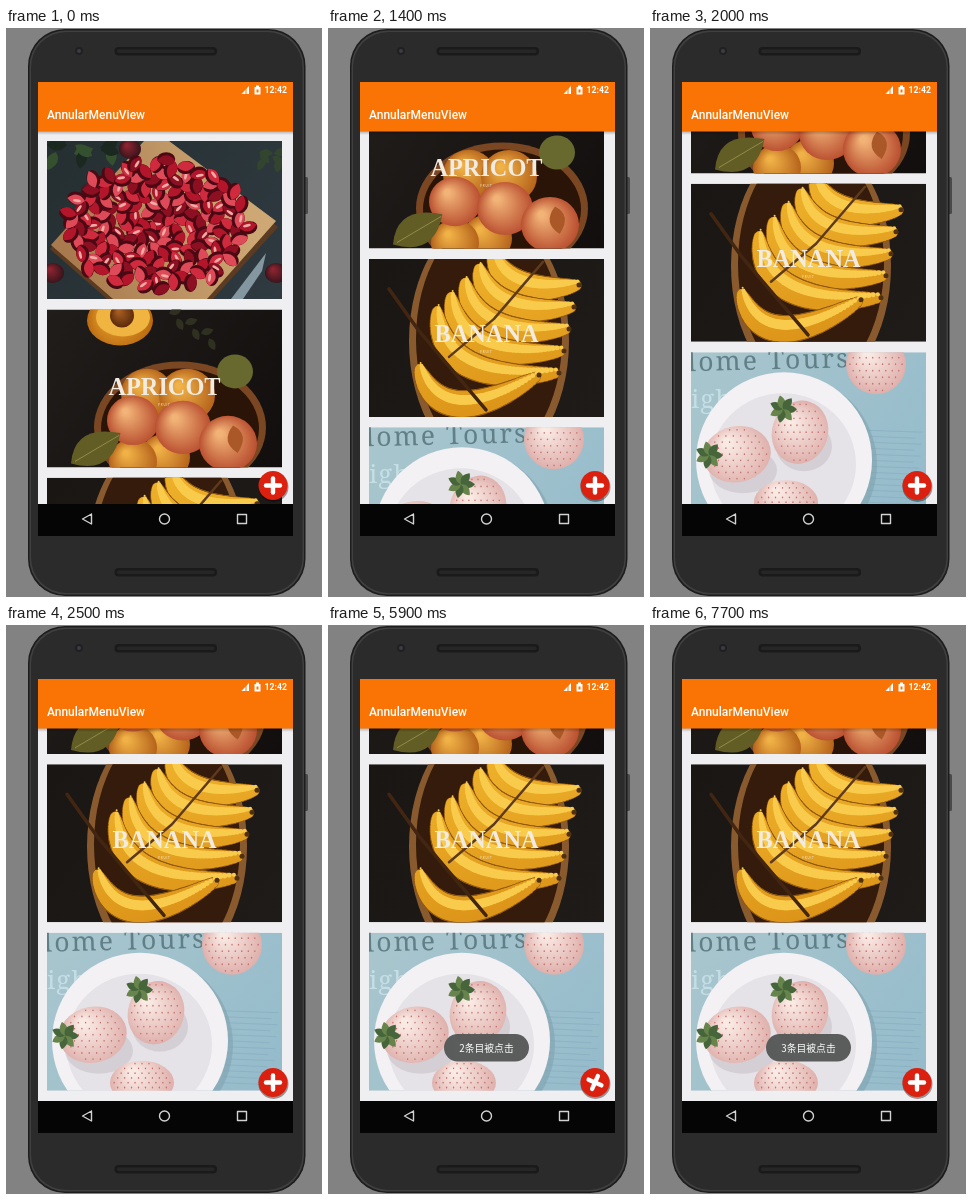
An HTML page with a canvas that plays this animation: 316x569 px, repeating every 8 s.

```html
<!DOCTYPE html>
<html lang="zh">
<head>
<meta charset="utf-8">
<title>AnnularMenuView</title>
<style>
html, body { margin: 0; width: 100%; height: 100%; overflow: hidden; background: #828282; }
canvas { display: block; width: 316px; height: 569px; }
</style>
</head>
<body>
<canvas id="stage" width="316" height="569"></canvas>
<script>
const g = document.getElementById('stage').getContext('2d');
const LOOP = 8000, TAU = Math.PI * 2;
const clamp = u => Math.max(0, Math.min(1, u));
const ease = u => 0.5 - Math.cos(clamp(u) * Math.PI) / 2;
const easeOut = u => 1 - (1 - clamp(u)) ** 1.2;

// Drawing helpers
function box(x, y, w, h, color, r = 0) {
  g.fillStyle = color;
  g.beginPath();
  g.roundRect(x, y, w, h, r);
  g.fill();
}
function oval(x, y, rx, ry, color, turn = 0) {
  g.fillStyle = color;
  g.beginPath();
  g.ellipse(x, y, rx, ry, turn, 0, TAU);
  g.fill();
}
function ball(x, y, rx, ry, light, dark, turn = 0) {
  const r = Math.max(rx, ry);
  const s = g.createRadialGradient(x - r * .3, y - r * .35, r * .1, x, y, r);
  s.addColorStop(0, light);
  s.addColorStop(1, dark);
  oval(x, y, rx, ry, s, turn);
}
function ring(x, y, r, color, width) {
  g.strokeStyle = color;
  g.lineWidth = width;
  g.beginPath();
  g.arc(x, y, r, 0, TAU);
  g.stroke();
}
function ramp(x0, y0, x1, y1, from, to) {
  const s = g.createLinearGradient(x0, y0, x1, y1);
  s.addColorStop(0, from);
  s.addColorStop(1, to);
  return s;
}
function trace(points) {
  g.beginPath();
  for (let i = 0; i < points.length; i += 2) g.lineTo(points[i], points[i + 1]);
}
function poly(color, ...points) {
  g.fillStyle = color;
  trace(points);
  g.fill();
}
function line(color, width, ...points) {
  g.strokeStyle = color;
  g.lineWidth = width;
  g.lineCap = g.lineJoin = 'round';
  trace(points);
  g.stroke();
}
function leaf(x, y, length, turn, color) {
  at(x, y, turn, 1, () => {
    g.fillStyle = color;
    g.beginPath();
    g.quadraticCurveTo;
    g.moveTo(0, 0);
    g.quadraticCurveTo(length * .4, -length * .55, length, 0);
    g.quadraticCurveTo(length * .5, length * .55, 0, 0);
    g.fill();
  });
}
function text(str, x, y, font, color, align = 'left', spacing = 0) {
  g.font = font;
  g.fillStyle = color;
  g.textAlign = align;
  g.letterSpacing = spacing + 'px';
  g.fillText(str, x, y);
}
function at(x, y, turn, scale, draw) {
  g.save();
  g.translate(x, y);
  g.rotate(turn);
  g.scale(scale, scale);
  draw();
  g.restore();
}
function clipped(x, y, w, h, draw) {
  g.save();
  g.beginPath();
  g.rect(x, y, w, h);
  g.clip();
  draw();
  g.restore();
}
function label(word, y) {
  text(word, 117.5, y, 'bold 24.3px "Liberation Serif", serif', '#f1ebe2', 'center');
  text('FRUIT', 117.5, y + 11, '3px Lato, sans-serif', '#f1ebe2', 'center', .8);
}

// Cards, each 235 x 158
function strawberries() {
  box(0, 0, 235, 158, ramp(0, 0, 235, 158, '#252f31', '#2f3a41'));
  for (let i = 0; i < 9; i++) leaf(i * 9, 4 + i * 7 % 12, 20, i * 2, i % 2 ? '#35502f' : '#1a2820');
  for (let i = 0; i < 6; i++) leaf(212 + i * 5, 12 + i * 5 % 14, 14, i * 2, '#33452f');
  poly('#5b3b22', 3, 108, 97, 0, 122, 0, 231, 86, 166, 158, 60, 158);
  poly(ramp(20, 100, 200, 60, '#a87a4d', '#cda774'), 4, 104, 97, 0, 122, 0, 229, 80, 160, 158, 66, 158);
  for (const [x, y] of [[45, 51], [83, 8], [229, 132], [6, 132]]) ball(x, y, 11, 10, '#8d2431', '#35141a');
  const reds = ['#b3152b', '#cf2a3e', '#8d0f22', '#de4a58'];
  const count = 150;
  for (let i = 0; i < count; i++) {
    const d = Math.sqrt(i / count), a = i * 2.4;
    at(110 + Math.cos(a) * d * 92, 84 + Math.sin(a) * d * 66, i * 1.7, 1, () => {
      oval(1, 1.5, 9, 6.5, '#4a0913');
      leaf(-8, 0, 18, 0, reds[i % 4]);
      if (i % 3 == 0) oval(0, -1, 4, 1.4, '#eeaaa4');
    });
  }
  poly('#8496a0', 184, 158, 219, 112, 215, 130, 196, 158);
}

function apricots() {
  box(0, 0, 235, 158, ramp(0, 0, 235, 158, '#211d1b', '#110e0d'));
  for (let i = 0; i < 6; i++) leaf(122 + i * 8, 4 + i * 5, 13, i % 2 * 1.4 - .3, '#2f301f');
  ball(73, 11, 33, 25, '#f3ad38', '#b9690f');
  oval(76, 8, 27, 19, '#f0b441');
  ball(75, 6, 12, 12, '#a55d20', '#5d2b0c');
  oval(133, 118, 86, 66, '#7a4722');
  oval(133, 119, 79, 60, '#2a1408');
  oval(188, 62, 18, 17, '#68692f');
  const fruit = [[100, 84, 26], [140, 86, 28], [118, 148, 25], [86, 152, 24], [86, 111, 26], [136, 118, 28], [181, 134, 29]];
  fruit.forEach(([x, y, r], i) =>
    ball(x, y, r, r * .95, i < 4 ? '#f0b146' : '#f2b377', i < 4 ? '#b5631b' : '#b94f30'));
  leaf(186, 116, 28, 1.4, '#ab5829');
  leaf(24, 154, 58, -.55, '#615d25');
  line('#938b48', 1, 28, 152, 72, 126);
  label('APRICOT', 85.5);
}

// A row of discs along a curve, thin at both ends
function banana(x0, y0, cx, cy, x1, y1) {
  const layers = [[14, '#935a10', 0], [12.7, ramp(60, 0, 110, 160, '#f0b42c', '#dc9418'), 0], [5, '#f9cb4c', 4]];
  for (const [r, color, lift] of layers) for (let u = 0; u <= 1; u += .02) {
    const v = 1 - u, size = r * (.2 + .8 * Math.sqrt(Math.sin(u * Math.PI)));
    const x = v * v * x0 + 2 * u * v * cx + u * u * x1;
    const y = v * v * y0 + 2 * u * v * cy + u * u * y1;
    oval(x + lift * .4, y - lift, size, size, color);
  }
  oval(x1, y1, 2.5, 2.5, '#4f300f');
}
function bananas() {
  box(0, 0, 235, 158, ramp(0, 0, 235, 158, '#1a1614', '#1f1b19'));
  oval(120, 82, 80, 126, '#8a5a2f');
  oval(120, 80, 73, 120, '#341b0b');
  for (let i = -1; i < 4; i++)
    banana(110 - 14 * i, 8 + 14 * i, 118 - 16 * i, 62 + 22 * i, 205 - 5 * i, 48 + 22 * i);
  banana(50, 108, 70, 178, 170, 116);
  line('#422611', 3.5, 20, 30, 50, 72, 117, 151);
  line('#5e3a1c', 2.5, 174, 3, 125, 60, 80, 98);
  label('BANANA', 83.5);
}

function paleBerry(x, y, rx, ry, turn, leafX, leafY) {
  ball(x, y, rx, ry, '#faeae4', '#dfb0ac', turn);
  for (let j = -4; j <= 4; j++) for (let i = -4; i <= 4; i++) {
    const u = (i + (j & 1) / 2) / 4.6, v = j / 4.6;
    if (u * u + v * v < .85) oval(x + u * rx, y + v * ry, .7, .9, '#c4706f');
  }
  for (let i = 0; leafX && i < 7; i++) leaf(leafX, leafY, 14, i * TAU / 7, i % 2 ? '#66844b' : '#47653b');
}
function plate() {
  box(0, 0, 235, 158, ramp(0, 0, 235, 158, '#a9c6cd', '#94bbcb'));
  at(0, 19, -.025, 1, () => text('lome Tours', -3, 0, '26.4px "Noto Serif", serif', '#617f87', 'left', 2.2));
  text('igh', 0, 56, '26px "Noto Serif", serif', '#c5dde4', 'left', 1);
  for (let i = 0; i < 13; i++) line('#82aabd88', 1, 175 + i % 3, 78 + i * 6, 231 - i * 7 % 13, 80 + i * 6);
  oval(97, 112, 89, 89, '#7f9fac88');
  oval(93, 108, 88, 88, '#f3f1f3');
  oval(92, 112, 73, 71, '#e6e3e8');
  oval(52, 118, 34, 23, '#c9c3c999');
  oval(113, 94, 28, 25, '#c9c3c999');
  paleBerry(185, 12, 30, 30, .4);
  paleBerry(46, 102, 34, 28, -.2, 18, 103);
  paleBerry(109, 80, 28, 32, .3, 92, 57);
  paleBerry(95, 150, 32, 22, 0);
}
const cards = [strawberries, apricots, bananas, plate];

// Each fling: start, length, distance
const flings = [[700, 900, 262], [1700, 300, 32], [2200, 300, 16.5]];
const scroll = t => flings.reduce((sum, [start, ms, px]) => sum + px * easeOut((t - start) / ms), 0);

function list(t) {
  const offset = scroll(t);
  clipped(32, 103, 255, 373, () => {
    box(32, 103, 255, 373, '#efeef0');
    cards.forEach((card, i) => at(41, 113 + i * 168.4 - offset, 0, 1, () => clipped(0, 0, 235, 158, card)));
    box(32, 103, 255, 4, ramp(0, 103, 0, 107, '#00000048', '#00000000'));
  });
}

// Menu icons: sky, hills and ground, some with a small figure
const scenes = [
  ['#f6a23a', '#b64a20', '#ed8126'],
  ['#20a39a', '#20a39a', '#e6f3ed', () => line('#f2faf5', 2.2, 0, 6, 0, -3, 4, -6)],
  ['#b4adb1', '#644a40', '#856957', () => poly('#f0ecea', -5, -6, -1, -2, -9, -2)],
  ['#e9bd4a', '#84614a', '#ddd2ba', () => poly('#fff4dc', -5, -6, -1, -2, -9, -2)],
  ['#efc03e', '#efc03e', '#c9932e', () => { box(-9, -6, 18, 13, '#4d4538', 2); box(-7, -3, 14, 7, '#f4ead1', 1); }]
];
function icon([sky, hills, ground, figure], x, y, turn, scale, alpha) {
  g.globalAlpha = alpha;
  at(x, y, turn, scale, () => {
    oval(.5, 1.5, 12.5, 12.5, '#00000055');
    g.beginPath();
    g.arc(0, 0, 12, 0, TAU);
    g.clip();
    box(-13, -13, 26, 26, sky);
    poly(hills, -13, 3, -5, -6, 2, 2, 7, -3, 13, 4, 13, 8, -13, 8);
    box(-13, 6, 26, 8, ground);
    figure?.();
  });
  g.globalAlpha = 1;
}

const rounds = [{ open: 3400, pick: 4900, item: 1 }, { open: 5900, pick: 7300, item: 2 }];

function menu(t) {
  let turn = 0;
  for (const { open, pick, item } of rounds) {
    const leave = t < pick ? 0 : (t - pick + 100) / 400;
    if (t < open || leave >= 1) continue;
    turn = ease((t - open + 100) / 600) * TAU;
    scenes.forEach((scene, i) => {
      const out = ease((t - open - i * 20) / 500);
      const a = (94 - i * 24.5) * TAU / 360;
      const scale = i == item ? 1 + leave * .9 : 1 - leave;
      icon(scene, 267 - Math.cos(a) * 68 * out, 457 - Math.sin(a) * 68 * out, out * TAU, scale, 1 - leave);
    });
  }
  oval(267.5, 459, 15, 15, '#00000060');
  oval(267, 457.5, 14.5, 14.5, '#dc2010');
  at(267, 457.5, turn, 1, () => {
    line('#fff', 4.4, -7, 0, 7, 0);
    line('#fff', 4.4, 0, -7, 0, 7);
  });
}

function toast(t) {
  for (const { pick, item } of rounds) {
    if (t < pick) continue;
    g.globalAlpha = Math.min(clamp((t - pick + 100) / 400), clamp((pick + 2200 - t) / 450));
    box(116, 409, 85, 27.5, '#545656f2', 13.7);
    text(item + 1 + '条目被点击', 158.5, 426.5, '9.8px "Noto Sans CJK SC", "Noto Sans CJK", sans-serif', '#fff', 'center');
    g.globalAlpha = 1;
  }
}

function phone() {
  box(0, 0, 316, 569, '#828282');
  box(297, 149, 5, 37, '#4a4a4b', 1.5);
  box(22, 1, 277.5, 567, '#1d1d1e', 37);
  box(23.5, 2.5, 274.5, 564, '#404041', 36);
  box(25, 4, 271.5, 561, '#2b2b2c', 35);
  for (const y of [19, 540]) {
    box(108.5, y, 102.5, 8.5, '#1a1a1b', 4);
    box(111, y + 2.5, 97.5, 3.5, '#262627', 2);
  }
  oval(73, 23, 4, 4, '#202022');
  oval(73, 23, 2, 2, '#3a3d41');
}

function bars() {
  const orange = '#f97405', ink = '#d2d2d2';
  box(32, 54, 255, 49.5, orange);
  poly('#fff', 235.5, 66, 243, 58, 243, 66);
  box(239.5, 58, 1, 8, orange);
  box(248.5, 59, 6, 7.5, '#fff', .5);
  box(250, 57.5, 3, 2, '#fff');
  box(250.5, 61.5, 2, 3, orange);
  text('12:42', 281, 65, 'bold 8.7px Roboto, sans-serif', '#fff', 'right');
  text('AnnularMenuView', 41, 91, '500 12px Roboto, sans-serif', '#fff');
  box(32, 476, 255, 32, '#050505');
  line(ink, 1.4, 85.5, 486, 76.5, 491, 85.5, 496, 85.5, 486);
  ring(158.5, 491, 5, ink, 1.4);
  g.strokeRect(231.5, 486.5, 9, 9);
}

function frame(now) {
  const t = Math.floor(now % LOOP / 100) * 100;
  phone();
  list(t);
  bars();
  menu(t);
  toast(t);
  requestAnimationFrame(frame);
}
requestAnimationFrame(frame);
</script>
</body>
</html>
```
